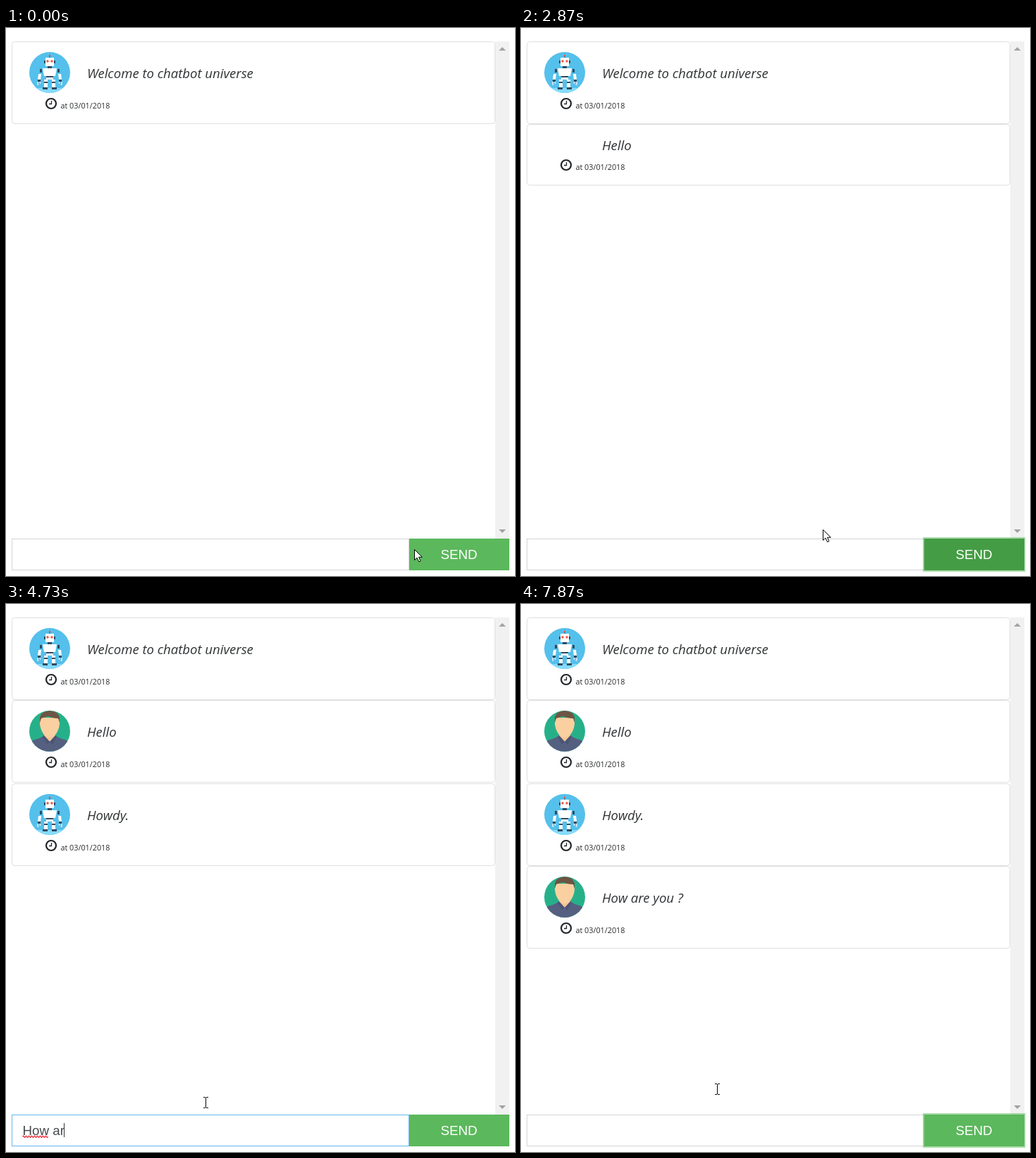
An HTML page for the animation above (8 s loop, 722 px wide and 776 px high).

```html
<!DOCTYPE html>
<html lang="en">
<head>
<meta charset="utf-8">
<title>Chatbot</title>
<style>
  html, body { margin: 0; width: 100%; height: 100%; overflow: hidden; background: #fff; }
  svg { display: block; width: 722px; height: 776px; }
  text { white-space: pre; }
  .msg { font: italic 18.6px "Open Sans", "Noto Sans", sans-serif; fill: #303335; }
  .time { font: 10.8px "Open Sans", "Noto Sans", sans-serif; fill: #292b2c; }
  .ui { font: 18.75px "Liberation Sans", Arial, sans-serif; }
</style>
</head>
<body>
<svg viewBox="0 0 722 776">
  <defs>
    <clipPath id="disc"><circle r="29"/></clipPath>
    <g id="bot">
      <circle r="29" fill="#54c0eb"/>
      <path d="M-19 22h38a29 29 0 0 1-38 0z" fill="#84dbff"/>
      <path d="M0-24v4" stroke="#324a5e"/>
      <circle cy="-24" r="1.2" fill="#f1543f"/>
      <path d="M-6-21h12v12h-12zM-10-6h20l-2 11h-16zM-5 6h10v4h-10zM-16 2h4l-1 8h-4zM12 2h4l1 8h-4zM-8 10h5v12h-5zM3 10h5v12h-5z" fill="#fff"/>
      <path d="M-3-9h6v3h-6zM-5 5h10v2h-10zM-14-5h3v5h-3zM11-5h3v5h-3zM-8 13h5v2h-5zM3 13h5v2h-5zM-17 10h4v3h-4zM13 10h4v3h-4zM-10 21h7v3h-7zM3 21h7v3h-7zM-8-17h2v4h-2zM6-17h2v4h-2z" fill="#324a5e"/>
      <path d="M-17 13v4h1.500M17 13v4h-1.500M-13.500 13v3M13.500 13v3" fill="none" stroke="#e6e9ee" stroke-width="1.500"/>
      <circle cx="-3" cy="-16" r="1.700" fill="#f1543f"/>
      <circle cx="3" cy="-16" r="1.700" fill="#f1543f"/>
    </g>
    <g id="man">
      <circle r="29" fill="#26b08a"/>
      <g clip-path="url(#disc)">
        <path d="M-30 30v-10q2-6 9-8 8-2 13-6h16q5 4 13 6 7 2 9 8v10z" fill="#556080"/>
        <path d="M-8 3h16v4l-8 8-8-8z" fill="#f6c693"/>
        <path d="M-14-19h28v9q-1 9-6 15-4 4-8 4t-8-4q-5-6-6-15z" fill="#fbd0a0"/>
        <path d="M-8 6l8 9-4 4-6-11zM8 6l-8 9 4 4 6-11z" fill="#4b5676"/>
        <path d="M-14-12v-8q2-8 14-9 12 1 14 9v8l-2-6q-8 0-14-3-5 1-10 3z" fill="#6d5544"/>
      </g>
    </g>
    <g id="clock" fill="none" stroke="#212529">
      <circle r="7" stroke-width="2.200"/>
      <path d="M.5-4v4.500h-3.500" stroke-width="1.300"/>
    </g>
    <path id="arrow" d="M.5.5v15l3.500-3.300 2.600 5.600 2.400-1-2.500-5.500h4.800z" fill="#fff" stroke="#000"/>
    <path id="beam" d="M-3-7.500h3m1 0h3M.5-7v14M-3 7.500h3m1 0h3" fill="none" stroke="#000"/>
  </defs>
  <rect x="694" y="19" width="20" height="704" fill="#f1f1f1"/>
  <path d="M699 32l5-5 5 5zM699 710h10l-5 5z" fill="#a3a3a3"/>
  <g id="view"></g>
</svg>
<script>
const LOOP = 8000, BLINK = 530, TEXT_X = 23.5;
const view = document.getElementById('view');
const pen = document.createElement('canvas').getContext('2d');
pen.font = '18.75px "Liberation Sans", Arial, sans-serif';

// sender, text, time shown, time the avatar is loaded
const messages = [
  ['bot', 'Welcome to chatbot universe', 0, 0],
  ['man', 'Hello', 2800, 3200],
  ['bot', 'Howdy.', 3200, 3200],
  ['man', 'How are you ?', 7470, 7670]
];
const typing = [
  [0, ''], [600, ''], [1270, 'H'], [1470, 'He'], [1600, 'Hel'], [1730, 'Hell'], [1870, 'Hello'],
  [2800, ''], [3330, ''], [4130, 'H'], [4330, 'Ho'], [4430, 'How'], [4530, 'How a'], [4730, 'How ar'],
  [4870, 'How are'], [4930, 'How are '], [5000, 'How are y'], [5530, 'How are '], [5670, 'How are y'],
  [5800, 'How are yo'], [5930, 'How are you'], [6070, 'How are you '], [6270, 'How are you ?'], [7470, '']
];
const path = [
  [70, 579, 738], [560, 442, 700], [730, 440, 705], [2330, 440, 705], [2660, 600, 750], [2740, 600, 750],
  [2870, 429, 710], [3130, 283, 706], [6730, 283, 706], [6870, 320, 696], [7200, 598, 757], [7450, 598, 757],
  [7870, 278, 687]
];

const within = (t, spans) => spans.some(([a, b]) => t >= a && t < b);
const clamp = v => Math.max(0, Math.min(1, v));
const fade = (t, spans) => spans.reduce((s, [a, b]) => s + clamp((t - a) / 150) - clamp((t - b) / 150), 0);
const mix = (a, b, k) => `rgb(${a.map((v, i) => Math.round(v + (b[i] - v) * k))})`;
const width = s => pen.measureText(s).width;

function card([who, text, shown, loaded], y, t) {
  const full = t >= loaded, h = full ? 116 : 86, up = full ? 0 : 15;
  return `<rect x="8.5" y="${y + .5}" width="685" height="${h}" rx="4" fill="#fff" stroke="#dfdfdf"/>` +
    (full ? `<use href="#${who}" x="62" y="${y + 44}"/>` : '') +
    `<text class="msg" x="115" y="${y + 51.5 - up}">${text}</text>
     <use href="#clock" x="64" y="${y + 88 - 2 * up}"/>
     <text class="time" x="77.5" y="${y + 95 - 2 * up}">at 03/01/2018</text>`;
}

function wave(before, word) {
  const n = Math.floor(width(word) / 2);
  return `<path d="M${TEXT_X + width(before)} 754.3q1-2.400 2 0${'t2 0'.repeat(n - 1)}" fill="none" stroke="#e8202a" stroke-width="1.2"/>`;
}

function field(t) {
  const focus = [[600, 2730], [3330, 7470]];
  const [since, text] = typing.findLast(k => k[0] <= t);
  const caretOn = within(t, focus) && Math.floor((t - since) / BLINK) % 2 === 0;
  const caret = Math.floor(TEXT_X + width(text)) + .5;
  return `<rect x="8.5" y="723.5" width="563" height="44" fill="#fff" stroke="${mix([213, 213, 213], [102, 183, 238], fade(t, focus))}"/>
    <text class="ui" x="${TEXT_X}" y="751.5" fill="#464a4c">${text}</text>` +
    (text.startsWith('How a') ? wave('', 'How') : '') +
    (text.startsWith('How are you ') ? wave('How are ', 'you') : '') +
    (caretOn ? `<path d="M${caret} 735v20" stroke="#333"/>` : '');
}

function button(t) {
  const hover = fade(t, [[2560, 3040], [7130, 7700]]);
  const ring = fade(t, [[2730, 3330], [7470, 9000]]);
  return `<rect x="571" y="722" width="143.500" height="47" fill="none" stroke="#5cb85c" stroke-width="2" opacity="${ring / 2}"/>
    <rect x="572" y="723" width="142" height="45" fill="${mix([92, 184, 92], [68, 157, 68], hover)}"/>
    <text class="ui" x="642.5" y="751.5" fill="#fff" text-anchor="middle">SEND</text>`;
}

function pointer(t) {
  const i = path.findIndex(k => k[0] > t);
  const b = path.at(i), a = path[Math.max(0, i < 0 ? path.length - 1 : i - 1)];
  const k = clamp((t - a[0]) / (b[0] - a[0] || 1));
  const [x, y] = [1, 2].map(n => Math.round(a[n] + (b[n] - a[n]) * k));
  const shape = within(t, [[0, 450], [2500, 3030], [6990, 7750]]) ? 'arrow' : 'beam';
  return `<use href="#${shape}" x="${x}" y="${y}"/>`;
}

function draw(t) {
  const cards = messages.filter(m => t >= m[2])
    .map((m, i) => card(m, Math.round(18.8 + i * 117.4), t)).join('');
  view.innerHTML = cards + field(t) + button(t) + pointer(t);
}

const start = performance.now();
function tick() {
  draw((performance.now() - start) % LOOP);
  requestAnimationFrame(tick);
}
tick();
</script>
</body>
</html>
```
